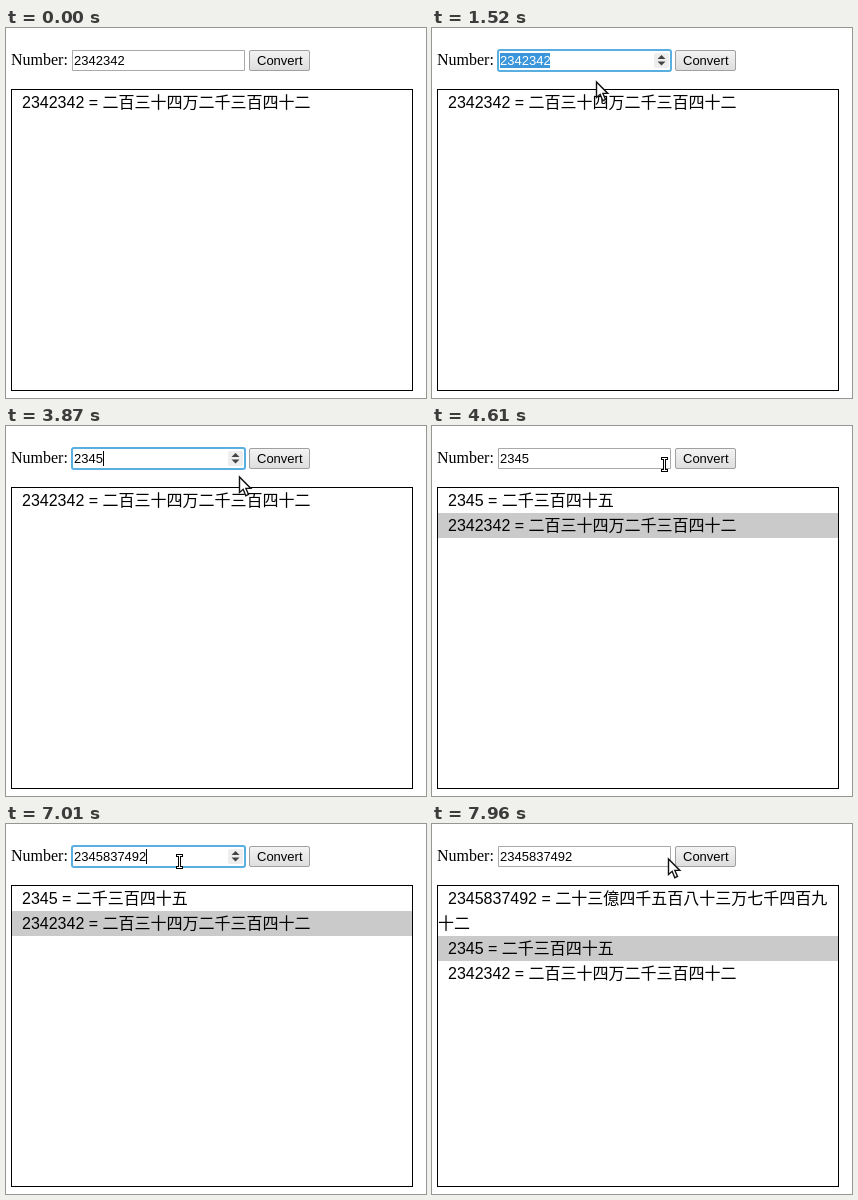
An HTML page with a canvas for the animation above (8000 ms loop, 420 by 370 pixels).

```html
<!DOCTYPE html>
<html lang="en">
<head>
<meta charset="utf-8">
<title>Number converter</title>
<style>
  html, body { margin: 0; width: 100%; height: 100%; overflow: hidden; background: #fff; }
  canvas { display: block; }
</style>
</head>
<body>
<canvas id="stage" width="420" height="370"></canvas>
<script>
const ctx = document.getElementById('stage').getContext('2d');
const LOOP = 8000, STEP = 40;
const SANS = '"Liberation Sans", Arial, "Noto Sans CJK JP", "Noto Sans CJK", sans-serif';
const SMALL = '13px ' + SANS, LARGE = '16px ' + SANS;
const SERIF = '16px "Liberation Serif", "Times New Roman", serif';

// Mouse path: time, x, y
const PATH = [
  [100, 173, 14], [320, 180, 28], [550, 180, 27], [950, 70, 31], [1060, 70, 31],
  [1320, 128, 44], [1520, 164, 53], [3510, 164, 53], [3870, 233, 50], [4190, 262, 36],
  [4490, 262, 36], [4610, 232, 38], [4810, 173, 37], [7310, 173, 37], [7550, 272, 31],
  [7800, 272, 31], [7960, 236, 34]
];
// Field value from each time on
const TYPING = [
  [0, '2342342'], [2920, '23'], [3140, '234'], [3550, '2345'], [6150, '23458'],
  [6450, '2345837'], [6680, '234583749'], [7010, '2345837492']
];
// Results, each with the time it is added and its wrapped lines
const RESULTS = [
  [7840, ['2345837492 = 二十三億四千五百八十三万七千四百九', '十二']],
  [4380, ['2345 = 二千三百四十五']],
  [0, ['2342342 = 二百三十四万二千三百四十二']]
];

const within = (t, ...spans) => spans.some(([a, b]) => t >= a && t < b);
const current = (list, t) => list.findLast(item => item[0] <= t);

function text(str, x, y, font, color = '#000') {
  ctx.font = font;
  ctx.fillStyle = color;
  ctx.fillText(str, x, y);
}

function rect(x, y, w, h, color) {
  ctx.fillStyle = color;
  ctx.fillRect(x, y, w, h);
}

function roundBox(x, y, w, h, r, stroke, fill, width = 1) {
  ctx.beginPath();
  ctx.roundRect(x, y, w, h, r);
  if (fill) { ctx.fillStyle = fill; ctx.fill(); }
  if (stroke) { ctx.strokeStyle = stroke; ctx.lineWidth = width; ctx.stroke(); }
}

function polygon(points, fill, stroke) {
  ctx.beginPath();
  points.forEach(([x, y]) => ctx.lineTo(x, y));
  ctx.closePath();
  ctx.fillStyle = fill;
  ctx.fill();
  if (stroke) { ctx.strokeStyle = stroke; ctx.lineWidth = 1.4; ctx.stroke(); }
}

function mouseAt(t) {
  const i = PATH.findLastIndex(p => p[0] <= t);
  if (i < 0) return null;
  const [t0, x0, y0] = PATH[i], [t1, x1, y1] = PATH[i + 1] || [LOOP, x0, y0];
  const k = Math.floor((t - t0) / STEP) * STEP / (t1 - t0);
  const x = Math.round(x0 + (x1 - x0) * k), y = Math.round(y0 + (y1 - y0) * k);
  return { x, y, inField: x > 66 && x < 235 && y > 22 && y < 43, onButton: x >= 243 && y < 43 };
}

function drawMouse({ x, y, inField }) {
  ctx.save();
  ctx.translate(x + 0.5, y + 0.5);
  if (inField) {
    for (const [color, width] of [['#000', 3], ['#fff', 1]]) {
      ctx.beginPath();
      for (const end of [-6, 6]) { ctx.moveTo(-2, end); ctx.lineTo(2, end); }
      ctx.moveTo(0, -6);
      ctx.lineTo(0, 6);
      ctx.lineCap = 'square';
      ctx.strokeStyle = color;
      ctx.lineWidth = width;
      ctx.stroke();
    }
  } else {
    polygon([[0, 0.5], [0, 16], [3.7, 12.8], [6.3, 19.2], [9, 18], [6.4, 11.9], [11.3, 11.9]], '#fff', '#111');
  }
  ctx.restore();
}

function drawField(t, mouse) {
  const value = current(TYPING, t)[1];
  const focused = within(t, [550, 4230], [5050, 7700]);
  if (focused) roundBox(66, 22, 173, 21, 2, '#5aaee0', '#fff', 2);
  else roundBox(66.5, 22.5, 172, 20, 0, '#a9a9a9', '#fff');

  if (focused || (mouse?.inField && mouse.x < 230)) {
    roundBox(222, 25, 15, 15, 2, null, '#eee');
    polygon([[225.5, 31], [229.5, 27], [233.5, 31]], '#444');
    polygon([[225.5, 33.5], [229.5, 37.5], [233.5, 33.5]], '#444');
  }

  text(value, 68, 37, SMALL);
  const widthOf = n => ctx.measureText(value.slice(0, n)).width;
  const end = Math.round(68 + widthOf(value.length));
  if (within(t, [550, 2920])) {
    const digit = widthOf(1);
    const from = t < 950 ? Math.min(value.length, Math.max(0, Math.round((mouse.x - 68) / digit))) : 0;
    const left = 68 + widthOf(from);
    if (from < value.length) {
      rect(Math.round(left), 25, 118 - Math.round(left), 15, '#3c96dc');
      text(value.slice(from), left, 37, SMALL, '#fff');
    }
  } else if (focused && !within(t, [6020, 6150], [7510, LOOP])) {
    rect(end, 25, 1, 15, '#000');
  }
}

function drawButton(t, mouse) {
  const pressed = within(t, [4230, 4380], [7700, 7840]);
  const [top, bottom] = pressed ? ['#d8d8d8', '#ebebeb'] : mouse?.onButton ? ['#fafafa', '#e6e6e6'] : ['#f4f4f4', '#dddddd'];
  const fill = ctx.createLinearGradient(0, 22, 0, 43);
  fill.addColorStop(0, top);
  fill.addColorStop(1, bottom);
  roundBox(243.5, 22.5, 60, 20, 1.5, '#a0a0a0', fill);
  text('Convert', 251, 37, SMALL);
}

function drawResults(t) {
  let y = 62;
  RESULTS.filter(([start]) => t >= start).forEach(([, lines], row) => {
    if (row % 2) rect(6, y, 400, 25 * lines.length, '#cacaca');
    lines.forEach((line, i) => {
      text(line, i ? 6 : 16, y + 18, LARGE);
      y += 25;
    });
  });
  ctx.strokeStyle = '#000';
  ctx.lineWidth = 1;
  ctx.strokeRect(5.5, 61.5, 401, 301);
}

function draw() {
  const t = performance.now() % LOOP, mouse = mouseAt(t);
  rect(0, 0, 420, 370, '#fff');
  text('Number:', 5, 37, SERIF);
  drawField(t, mouse);
  drawButton(t, mouse);
  drawResults(t);
  if (mouse) drawMouse(mouse);
  requestAnimationFrame(draw);
}
draw();
</script>
</body>
</html>
```
